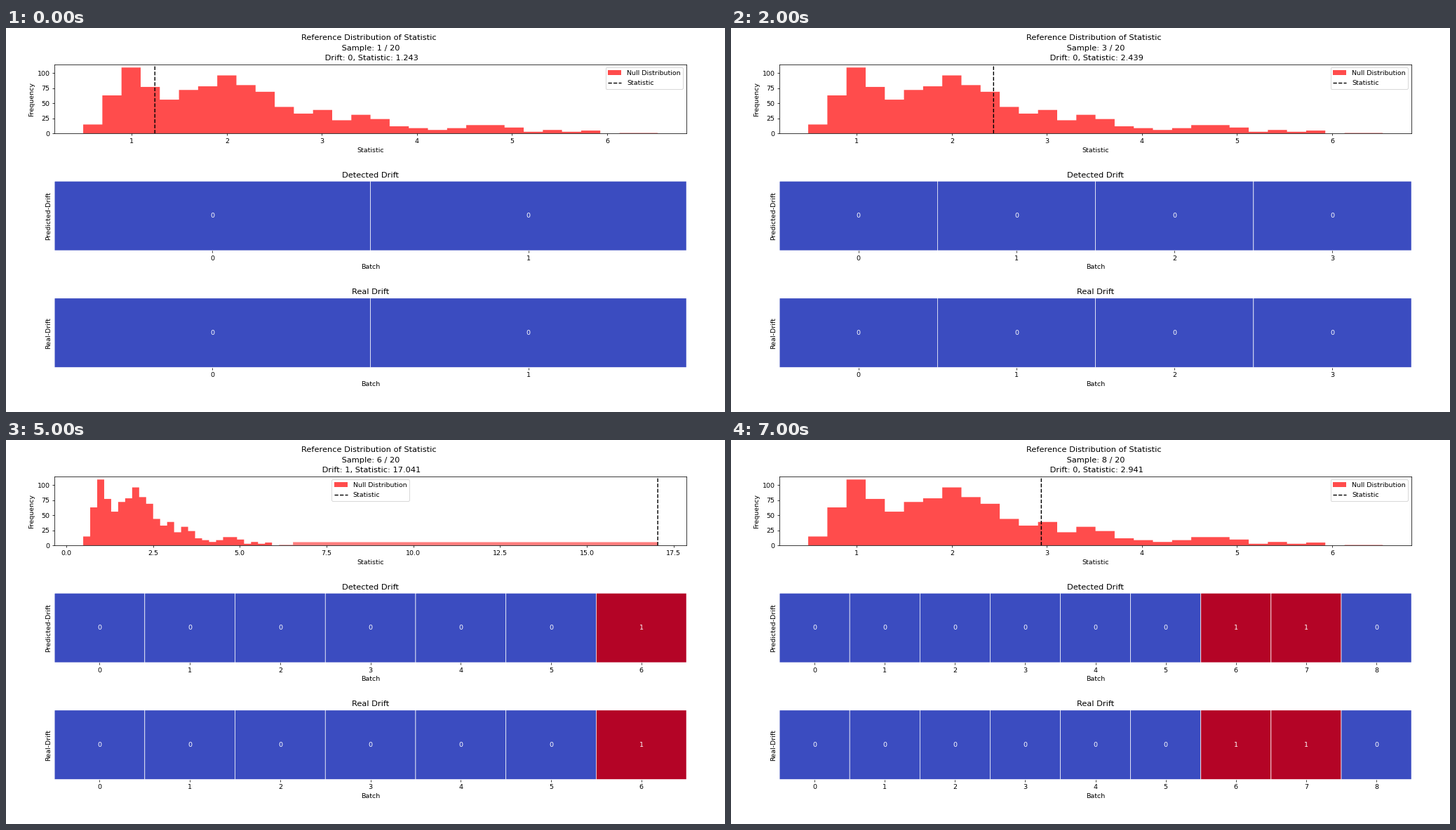
Write a matplotlib script that moves like this. It is 1025x547 px and loops after 8 s.

```python
import matplotlib.pyplot as plt
import numpy as np
from matplotlib.animation import FuncAnimation

WIDTH, HEIGHT = 1025, 547
DPI = WIDTH / 15
LEFT, RIGHT = 69.1, 970.1
PANEL_HEIGHT = 98.8
BOTTOMS = (150.4, 317.0, 483.6)

NULL_MIN, NULL_MAX = 0.489, 6.533
COUNTS = [15, 63, 109, 77, 56, 72, 78, 96, 80, 69, 44, 33, 39, 22, 31,
          24, 12, 9, 6, 9, 14, 14, 10, 3, 6, 3, 5, 0, 1, 1]
EDGES = np.linspace(NULL_MIN, NULL_MAX, len(COUNTS) + 1)

STATISTICS = [1.243, 1.958, 2.439, 2.127, 1.67, 17.041, 15.341, 2.941]
DRIFTS = [int(s > NULL_MAX) for s in STATISTICS]
TOTAL_SAMPLES = 20

TITLE_PAD, TITLE_STEP = 6, 15.1  # points

plt.rcParams["font.family"] = "DejaVu Sans"

fig = plt.figure(figsize=(WIDTH / DPI, HEIGHT / DPI), dpi=DPI, facecolor="white")


def add_panel(bottom):
    return fig.add_axes([LEFT / WIDTH, 1 - bottom / HEIGHT,
                         (RIGHT - LEFT) / WIDTH, PANEL_HEIGHT / HEIGHT])


hist_ax, detected_ax, real_ax = map(add_panel, BOTTOMS)


def draw_title(ax, *lines):
    for row, line in enumerate(reversed(lines)):
        ax.annotate(line, (0.5, 1), xycoords="axes fraction",
                    xytext=(0, TITLE_PAD + row * TITLE_STEP),
                    textcoords="offset points", fontsize=12,
                    ha="center", va="baseline")


def draw_histogram(ax, sample):
    statistic, drift = STATISTICS[sample], DRIFTS[sample]
    ax.clear()
    ax.stairs(COUNTS, EDGES, fill=True, color="red", alpha=0.7, snap=False,
              label="Null Distribution")
    ax.axvline(statistic, color="black", linestyle="--", snap=False,
               label="Statistic")
    if drift:
        ax.axvspan(NULL_MAX, statistic, ymax=0.05, facecolor="red", alpha=0.5,
                   snap=False)

    high = max(NULL_MAX, statistic)
    margin = 0.05 * (high - NULL_MIN)
    ax.set_xlim(NULL_MIN - margin, high + margin)
    ax.set_ylim(0, 1.05 * max(COUNTS))
    # Outer spaces shift the centred lines slightly.
    draw_title(ax, "Reference Distribution of Statistic ",
               f" Sample: {sample + 1} / {TOTAL_SAMPLES} ",
               f" Drift: {drift}, Statistic: {statistic}")
    ax.set_xlabel("Statistic")
    ax.set_ylabel("Frequency")
    ax.legend(loc="upper center" if drift else "upper right")


def draw_heatmap(ax, values, title, ylabel):
    ax.clear()
    ax.pcolormesh([values], cmap="coolwarm", vmin=0, vmax=1, edgecolors="white",
                  linewidth=0.72, antialiased=True, snap=False)
    for i, value in enumerate(values):
        ax.text(i + 0.5, 0.5, str(value), color="white", ha="center", va="center")
    ax.set_xlim(0, len(values))
    ax.set_ylim(1, 0)
    ax.set_xticks(np.arange(len(values)) + 0.5, range(len(values)))
    ax.set_yticks([])
    ax.spines[:].set_visible(False)
    draw_title(ax, title)
    ax.set_xlabel("Batch")
    ax.set_ylabel(ylabel)


def update(sample):
    batches = [0] + DRIFTS[:sample + 1]
    draw_histogram(hist_ax, sample)
    draw_heatmap(detected_ax, batches, "Detected Drift", "Predicted-Drift")
    draw_heatmap(real_ax, batches, "Real Drift", "Real-Drift")
    return []


animation = FuncAnimation(fig, update, frames=len(STATISTICS), interval=1000,
                          init_func=lambda: update(0), repeat=True, repeat_delay=0)
plt.show()
```
